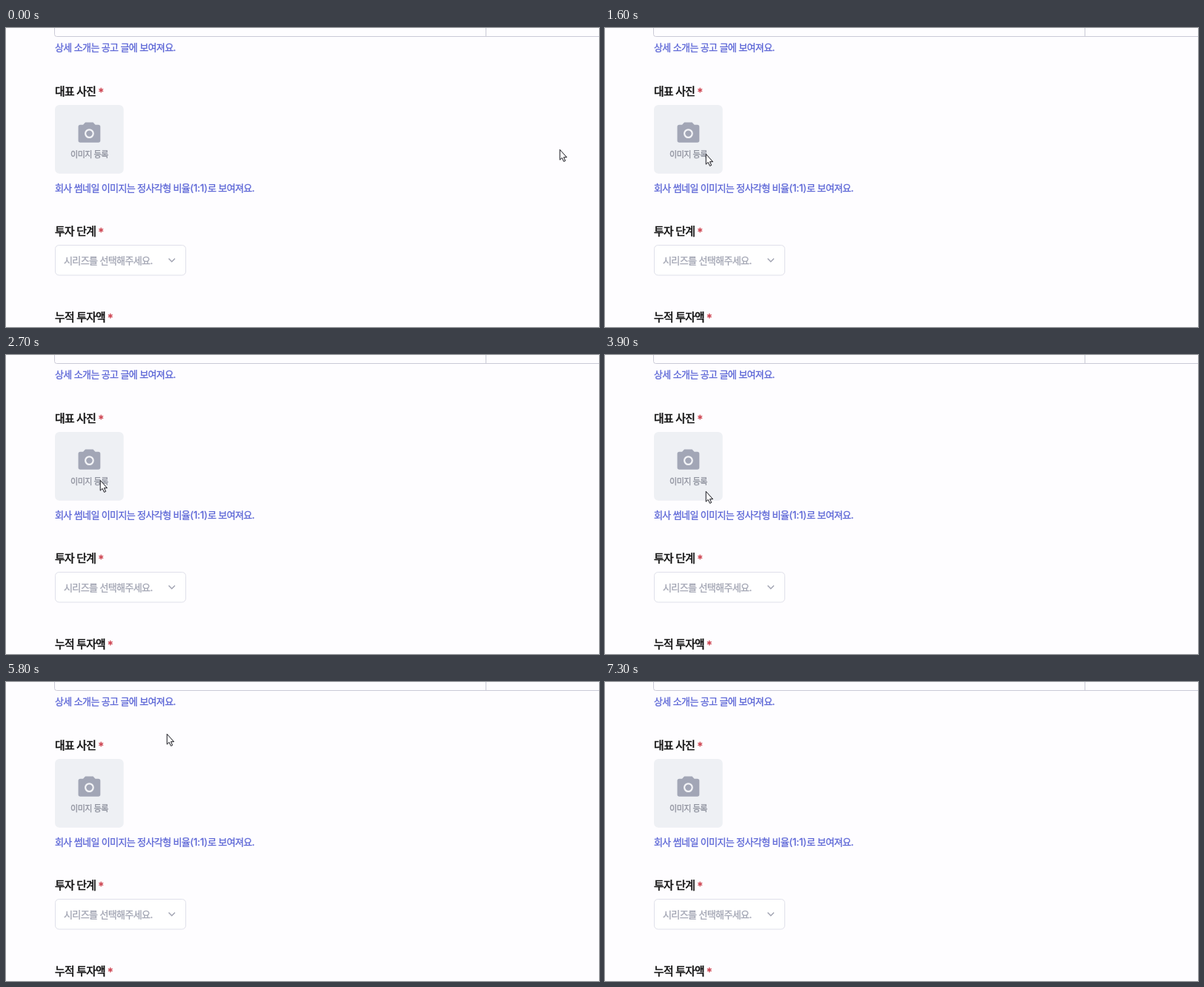
An HTML page for the animation above (8 s loop, 800 by 404 pixels).

```html
<!DOCTYPE html>
<html lang="ko">
<head>
<meta charset="utf-8">
<style>
  html, body { margin: 0; width: 100%; height: 100%; overflow: hidden; background: #fefdff; }
  svg { display: block; }
  /* A thin outline gives the medium weights between regular and bold. */
  text {
    font: 400 13px Inter, "Noto Sans CJK KR", "Noto Sans CJK", sans-serif;
    letter-spacing: -.048em;
    fill: currentColor;
    stroke: currentColor;
    stroke-width: .3px;
  }
  .hint { color: #5b65d6; }
  .hint tspan { letter-spacing: 0; }
  .muted { color: #a2a5b3; }
  .label { color: #8f929e; font-size: 11.1px; }
  .title { color: #111; font-size: 14.8px; stroke-width: .6px; }
  .star { color: #cb3a48; font-size: 15px; }
</style>
</head>
<body>
<svg width="800" height="404" viewBox="0 0 800 404">
  <g fill="none" stroke="#cacad6">
    <path d="M65.5 0V8.5Q65.5 11.5 68.5 11.5H800M647.5 0V11"/>
    <rect x="66.5" y="293.5" width="176" height="40.5" rx="5" fill="#fff" stroke="#dfe0ea"/>
    <path d="M219.5 311.5L223.7 315.8L227.9 311.5" stroke="#a0a3b1" stroke-width="1.4"/>
  </g>

  <rect x="66" y="104" width="92.7" height="92.7" rx="6" fill="#eef0f4"/>
  <path fill="#a2a6b6" d="M107 127.5H117.5L120.5 130.7H124.5Q127.3 130.7 127.3 133.5V152Q127.3 154.7 124.5 154.7H100.3Q97.5 154.7 97.5 152V133.5Q97.5 130.7 100.3 130.7H104Z"/>
  <circle cx="112.4" cy="142.6" r="5.3" fill="none" stroke="#f3f4f7" stroke-width="2.2"/>

  <text class="hint" x="66" y="31">상세 소개는 공고 글에 보여져요.</text>
  <text class="hint" x="66" y="220.5">회사 썸네일 이미지는 정사각형 비율<tspan>(1:1)</tspan>로 보여져요.</text>
  <text class="label" x="87" y="174.8">이미지 등록</text>
  <text class="muted" x="78" y="318.8">시리즈를 선택해주세요.</text>
  <text class="title" x="66" y="90.5">대표 사진</text>
  <text class="title" x="66" y="280">투자 단계</text>
  <text class="title" x="66" y="395.5">누적 투자액</text>
  <text class="star" x="124.5" y="91.5">*</text>
  <text class="star" x="124.5" y="281">*</text>
  <text class="star" x="137" y="396.5">*</text>

  <path id="cursor" fill="#fff" stroke="#15151c" d="M.2 .3V14.2L3.1 11.4L5.5 16.4L7.6 15.4L5.4 10.7H9.5Z"/>
</svg>
<script>
  const LOOP = 8000, STEP = 100;
  const cursor = document.getElementById('cursor');
  const moves = [];
  let last = [747, 164];

  // Glide to a point in a number of steps; swing bows the path sideways.
  function glide(start, steps, to, swing = [0, 0]) {
    moves.push({ start, steps, from: last, to, swing });
    last = to;
  }

  glide(100, 4, [194, 240], [-150, 174]);
  glide(1000, 3, [246, 245]);
  glide(1500, 2, [136, 170], [64, 40]);
  glide(2000, 2, [127, 172], [-20, -17]);
  glide(2300, 2, [318, 20]);
  glide(2500, 3, [127, 169], [60, 200]);
  glide(2800, 1, [134, 168]);
  glide(3500, 5, [136, 184], [-41, 25]);
  glide(4000, 4, [318, 77], [80, 0]);
  glide(4600, 2, [236, 10]);
  glide(4800, 2, [233, 7], [-165, 22]);
  glide(5100, 5, [217, 70], [-125, 117]);
  glide(6300, 3, [85, 157]);
  glide(6600, 3, [577, 0]);
  glide(6900, 3, [241, 23]);
  glide(7200, 2, [73, 579]);

  function place(time) {
    const move = moves.findLast(m => m.start <= time) || moves[0];
    const { start, steps, from, to, swing } = move;
    const u = Math.min(1, Math.floor((time - start) / STEP + 1) / steps);
    const at = i => from[i] + (to[i] - from[i]) * u + swing[i] * Math.sin(Math.PI * u);
    cursor.setAttribute('transform', `translate(${at(0)} ${at(1)})`);
  }

  function tick() {
    place(performance.now() % LOOP);
    requestAnimationFrame(tick);
  }
  tick();
</script>
</body>
</html>
```
